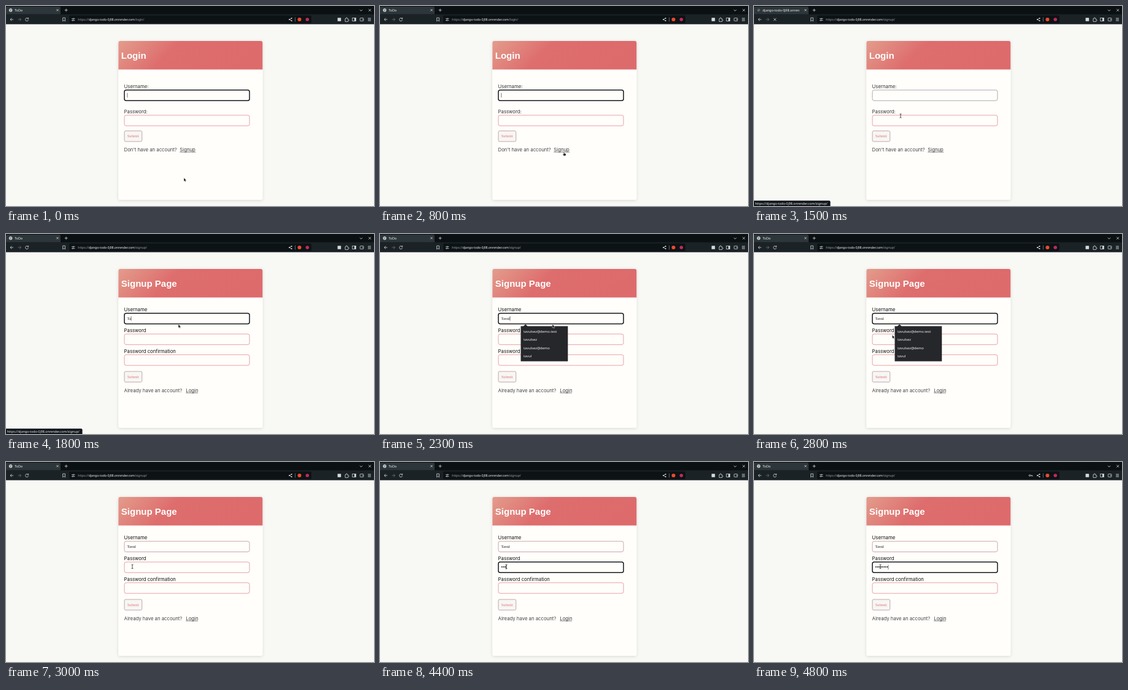
These frames come from a looping animation (600 by 326 pixels, 5000 ms). An HTML page:

```html
<!DOCTYPE html>
<html lang="en">
<head>
<meta charset="utf-8">
<title>ToDo</title>
<style>
  html, body { margin: 0; width: 100%; height: 100%; overflow: hidden; background: #f8f8f5; }
  svg { display: block; width: 100vw; height: 100vh; }
  text { white-space: pre; }
  .ui { font-family: "Noto Sans", "Open Sans", sans-serif; fill: #f1f3f4; }
  .label { font: 7.75px Inter, sans-serif; }
  .title { font: bold 15px "Liberation Sans", Arial, sans-serif; fill: #fff; }
  .value { font: 6.25px "Liberation Serif", Times, serif; fill: #111; }
  .icon { fill: none; stroke: #d5d9db; stroke-width: .8; }
  .dim { stroke: #70787c; }
  .field { fill: #fffefb; stroke: #e8959b; stroke-width: .9; }
  .field.touched { stroke: #c59da3; }
  .field.left { stroke: #a3a3a8; }
  .field.focus { stroke: #15181c; stroke-width: 1.5; }
  .caret { stroke: #222; stroke-width: .6; }
</style>
</head>
<body>
<svg viewBox="0 0 600 326" preserveAspectRatio="none">
  <defs>
    <linearGradient id="coral" x1="0" y1="0" x2="1" y2=".2">
      <stop offset="0" stop-color="#e39c8c"/>
      <stop offset=".42" stop-color="#de6d6d"/>
      <stop offset="1" stop-color="#dd6b6c"/>
    </linearGradient>
    <filter id="shadow" x="-10%" y="-10%" width="120%" height="120%">
      <feDropShadow dx="0" dy="1" stdDeviation="2.5" flood-color="#000" flood-opacity=".13"/>
    </filter>
  </defs>

  <rect width="600" height="326" fill="#f8f8f5"/>

  <g id="browser">
    <rect width="600" height="14" fill="#0b1013"/>
    <rect y="13.5" width="600" height="16.2" fill="#1b2226"/>
    <path d="M0 13.5V3q0-2 2-2H87q2 0 2 2V13.5Z" fill="#2d363a"/>
    <rect x="103" y="15.5" width="395" height="12.5" rx="2" fill="#0d1215"/>
    <g class="icon">
      <path d="M82.3 5l3.4 3.4m0-3.4l-3.4 3.4M95.6 6.8h5M98.1 4.3v5M576.8 6l2.2 2.2 2.2-2.2M591.2 4.8l4 4m0-4l-4 4"/>
      <path d="M12 22H7m2.3-2.4L6.9 22l2.4 2.4"/>
      <path class="dim" d="M19.5 22h5m-2.3-2.4l2.4 2.4-2.4 2.4"/>
      <path d="M92.6 19.2h3.8v5.6l-1.9-1.5-1.9 1.5z"/>
      <path d="M107 20.7h2.2m1.8 0h1.4M107 23.5h1m1.8 0h2.6"/>
      <circle cx="110.1" cy="20.7" r=".8"/><circle cx="108.9" cy="23.5" r=".8"/>
      <path d="M465.4 20.1l-3.4 1.9 3.4 1.9"/>
      <path class="dim" d="M471.5 18.5v7"/>
      <path d="M553 20.7h1.3q-.3-1.8 1-1.8t1 1.8h1.3v1.5q1.6-.2 1.6 1t-1.6 1v1.2H553z"/>
      <rect x="564.8" y="19.4" width="5.6" height="5.2"/>
      <path d="M569 19.4v5.2" stroke-width="2"/>
      <rect x="577.3" y="19.6" width="5.6" height="4.8" rx=".8"/>
      <path d="M580.5 22h2.4M590 20h5m-5 2h5m-5 2h5"/>
    </g>
    <g fill="#d5d9db">
      <circle cx="465.6" cy="20" r="1"/><circle cx="462" cy="22" r="1"/><circle cx="465.6" cy="24" r="1"/>
      <rect x="540.6" y="19.2" width="5.6" height="5.6" rx=".6"/>
    </g>
    <circle cx="478.5" cy="22" r="3" fill="#ec4b2f"/>
    <circle cx="491.3" cy="22" r="2.8" fill="#c22a5c"/>
    <g id="ready" class="icon">
      <circle cx="7.6" cy="6.8" r="2.5" fill="#c5cacc"/>
      <path d="M6 5.6l2 1-1 2m1.6-3.2l.8 1.2" stroke="#3a4347" stroke-width=".6"/>
      <path d="M36 20.5a2.5 2.5 0 1 0 .5 2M36.6 18.9v2h-2"/>
    </g>
    <g id="loading" class="icon">
      <circle class="dim" cx="7.6" cy="6.8" r="1.9"/>
      <path d="M6.5 8.1l2.3-2.5M31.9 19.8l4.4 4.4m0-4.4l-4.4 4.4"/>
    </g>
    <g id="key" class="icon">
      <circle cx="449.6" cy="22" r="1.3"/><path d="M451 22h3v1.5m-1.2-1.5v1.2"/>
    </g>
    <text id="tab" class="ui" x="14" y="8.8" font-size="5.4"></text>
    <text class="ui" x="117.3" y="23.8" font-size="5.05"><tspan fill="#9aa1a5">https://</tspan>django-todo-0j98.onrender.com<tspan id="path" fill="#9aa1a5"></tspan></text>
  </g>

  <g filter="url(#shadow)">
    <rect x="183.3" y="57" width="235" height="259" rx="3" fill="#fffefb"/>
  </g>
  <path d="M183.3 103.6V60q0-3 3-3h129 99q3 0 3 3v43.6z" transform="translate(183.3) scale(1.0043 1) translate(-183.3)" fill="url(#coral)"/>
  <text id="heading" class="title" x="187.8" y="85.5"></text>

  <g id="login"></g>
  <g id="signup"></g>

  <g id="popup">
    <path d="M229.5 150.3h4.2l3.5-3 3.5 3H306.3V207.6H229.5Z" fill="#26272b"/>
  </g>
  <g id="status">
    <path d="M0 317.3h122.5q2 0 2 2V326H0Z" fill="#10161a"/>
    <text class="ui" x="1.8" y="323.6" font-size="5.3">https://django-todo-0j98.onrender.com/signup/</text>
  </g>

  <g id="mouse">
    <path id="arrow" d="M0 0V6l1.4-1.2.9 2 1-.5-.9-1.9h1.8z" fill="#111" stroke="#fff" stroke-width=".4"/>
    <path id="hand" d="M-.6 .3q.6-.7 1.1 0v2l2 .5q.7.2.6 1L2.7 6H-.4L-2.2 3.8q.3-.7 1.6.1z" fill="#111" stroke="#fff" stroke-width=".3"/>
    <path id="beam" d="M-1.5-3.2Q0-3.2 0-2.5 0-3.2 1.5-3.2M0-2.8V2.8M-1.5 3.2Q0 3.2 0 2.5 0 3.2 1.5 3.2" fill="none" stroke="#222" stroke-width=".8"/>
  </g>
</svg>

<script>
const $ = id => document.getElementById(id);
const USER = 'Tavul';
const LOOP = 5000;

const label = (text, y, color, x = 192.6) =>
  `<text class="label" x="${x}" y="${y}" fill="${color}">${text}</text>`;

const link = (text, x, y, width) =>
  label(text, y, '#3a3a3a', x) +
  `<path d="M${x} ${y + 1.4}h${width}" stroke="#3a3a3a" stroke-width=".6"/>`;

const field = (id, y) => `
  <rect id="${id}" class="field" x="193" y="${y}" width="204" height="17.3" rx="3"/>
  <text id="${id}Text" class="value" x="197.6" y="${y + 10.7}"></text>
  <path id="${id}Caret" class="caret" d="M0 ${y + 4.8}v7.4"/>`;

const submit = y => `
  <rect x="193" y="${y}" width="28.7" height="17.3" rx="2" fill="#f7f6f3" stroke="#b9a0a2" stroke-width=".9"/>
  <text class="value" x="197.7" y="${y + 10.8}" style="font-size:6.6px;fill:#e0767e">Submit</text>`;

$('login').innerHTML =
  label('Username:', 133.8, '#333') + field('loginUser', 137) +
  label('Password:', 174.8, '#333') + field('loginPass', 178) +
  submit(203.6) +
  label("Don't have an account?", 236.8, '#444') + link('Signup', 283.3, 236.8, 26);

$('signup').innerHTML =
  label('Username', 126.4, '#111') + field('newUser', 129.2) +
  label('Password', 159.8, '#111') + field('newPass', 163) +
  label('Password confirmation', 193.6, '#111') + field('confirm', 196.8) +
  submit(224) +
  label('Already have an account?', 257.7, '#444') + link('Login', 293.3, 257.7, 19.6);

$('newPassText').style.fontSize = '7.5px';
$('newPassText').setAttribute('y', 173.7);

['tavulsez@demo.test', 'tavulsez', 'tavulsez@demo', 'tavul'].forEach((entry, i) => {
  $('popup').innerHTML +=
    `<text class="ui" x="234" y="${160.9 + i * 13.5}" font-size="5.75">${entry}</text>`;
});

// Each step lists only what changes at that time.
const steps = [
  [0, { page: 'login', focus: 'loginUser', caret: true, pointer: 'arrow', typed: 0, dots: 0 }],
  [300, { caret: false }],
  [600, { pointer: 'hand' }],
  [800, { caret: true }],
  [1300, { focus: '', caret: false, loading: true, status: true }],
  [1400, { pointer: 'arrow' }],
  [1500, { pointer: 'beam' }],
  [1600, { page: 'signup', focus: 'newUser', caret: true, loading: false, pointer: 'arrow' }],
  [1800, { typed: 2 }],
  [2300, { typed: 5, popup: true, status: false }],
  [2800, { caret: false }],
  [3000, { focus: '', popup: false, pointer: 'beam' }],
  [4400, { focus: 'newPass', caret: true, dots: 3 }],
  [4500, { dots: 5 }],
  [4600, { dots: 7, key: true }],
  [4800, { dots: 8 }]
];

const glides = [
  { at: 100, count: 6, gap: 100, from: [290, 280], to: [300, 238] },
  { at: 1300, count: 3, gap: 100, from: [300, 238], to: [239, 179] },
  { at: 1600, count: 2, gap: 200, from: [239, 179], to: [281, 147] },
  { at: 2500, count: 6, gap: 100, from: [281, 147], to: [206, 170.5] }
];

function mouseAt(t) {
  const glide = glides.filter(g => g.at <= t).pop();
  if (!glide) return glides[0].from;
  const done = Math.min(1, (Math.floor((t - glide.at) / glide.gap) + 1) / glide.count);
  const eased = done * done * (3 - 2 * done);
  return glide.from.map((v, i) => v + (glide.to[i] - v) * eased);
}

const show = (id, on) => { $(id).style.display = on ? '' : 'none'; };

function write(id, text) {
  if ($(id).textContent !== text) $(id).textContent = text;
}

function render(t) {
  const s = Object.assign({}, ...steps.filter(([at]) => at <= t).map(([, change]) => change));
  const signup = s.page === 'signup';

  show('login', !signup);
  show('signup', signup);
  show('loading', s.loading);
  show('ready', !s.loading);
  ['popup', 'status', 'key'].forEach(id => show(id, s[id]));
  ['arrow', 'hand', 'beam'].forEach(id => show(id, s.pointer === id));

  write('heading', signup ? 'Signup Page' : 'Login');
  write('tab', s.loading ? 'django-todo-0j98.onren' : 'ToDo');
  write('path', signup || s.loading ? '/signup/' : '/login/');
  write('newUserText', USER.slice(0, s.typed));
  write('newPassText', '•'.repeat(s.dots));

  for (const id of ['loginUser', 'loginPass', 'newUser', 'newPass', 'confirm']) {
    const focused = s.focus === id;
    $(id).classList.toggle('focus', focused);
    show(id + 'Caret', focused && s.caret);
    if (focused) {
      const end = 197.9 + $(id + 'Text').getComputedTextLength();
      $(id + 'Caret').setAttribute('transform', `translate(${end})`);
    }
  }
  $('loginUser').classList.toggle('left', !s.focus);
  $('newUser').classList.toggle('touched', t >= 3000);

  $('mouse').setAttribute('transform', `translate(${mouseAt(t)})`);
}

const start = performance.now();
function tick() {
  render((performance.now() - start) % LOOP);
  requestAnimationFrame(tick);
}
tick();
</script>
</body>
</html>
```
